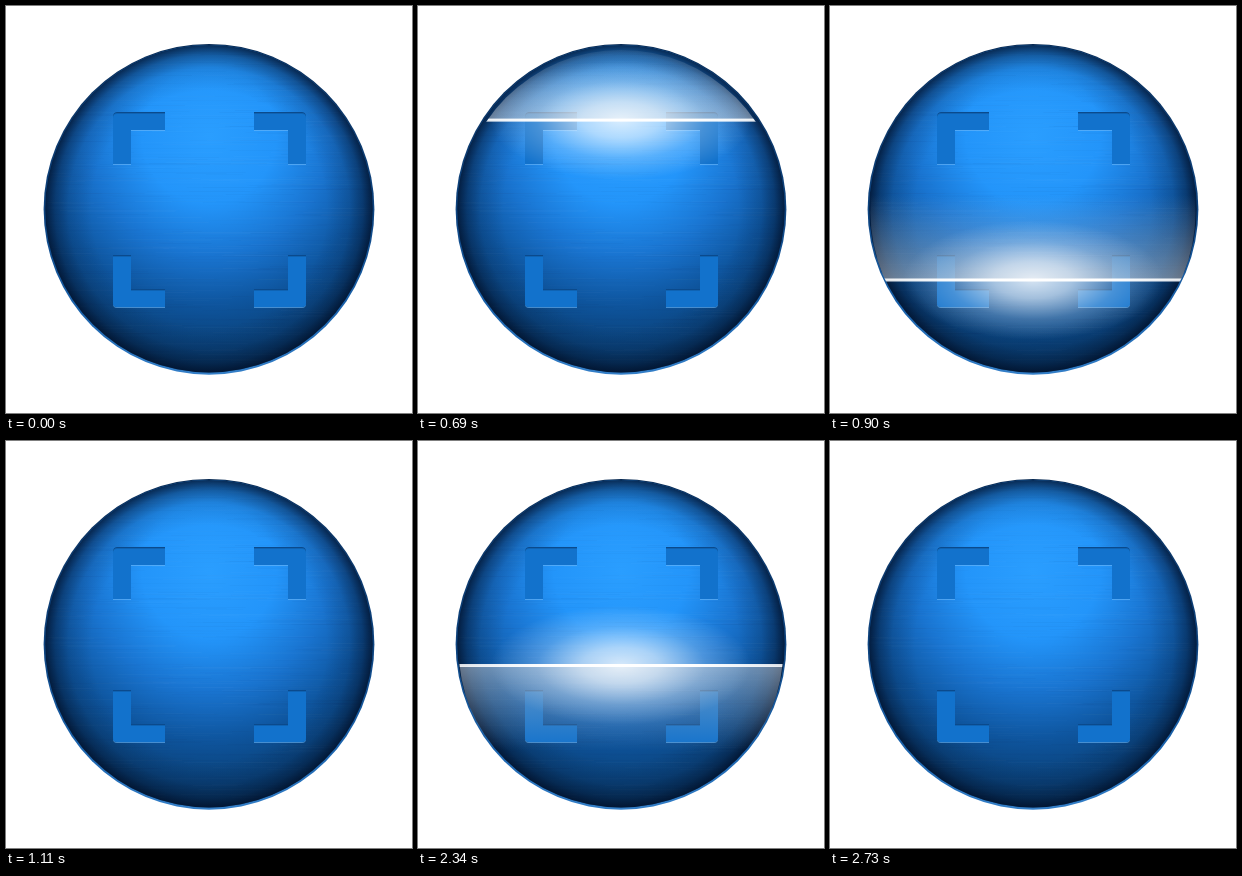
Animation, 406 px wide and 407 px high, one loop 3.6 s. Source, as an HTML page with a canvas:

```html
<!DOCTYPE html>
<html>
<head>
<meta charset="utf-8">
<title>Scanner button</title>
<style>
html, body { margin: 0; width: 100%; height: 100%; overflow: hidden; background: #fff; }
canvas { display: block; }
</style>
</head>
<body>
<canvas id="stage" width="406" height="407"></canvas>
<script>
const W = 406, H = 407, CX = 203, CY = 203.3, LOOP = 3600, STEP = 30, TRAIL = 85;
const ctx = document.getElementById('stage').getContext('2d');
const base = document.createElement('canvas');
base.width = W;
base.height = H;

function fillStops(g, stops) {
  stops.forEach(([at, color]) => g.addColorStop(at, color));
  return g;
}

function radial(c, x, y, r, stops) {
  return fillStops(c.createRadialGradient(x, y, 0, x, y, r), stops);
}

function disc(c, y, r, fill) {
  c.beginPath();
  c.arc(CX, y, r, 0, Math.PI * 2);
  c.fillStyle = fill;
  c.fill();
}

function streaks(c) {
  let seed = 7;
  const rnd = () => (seed = seed * 16807 % 2147483647) / 2147483647;
  c.save();
  c.beginPath();
  c.arc(CX, CY, 163, 0, Math.PI * 2);
  c.clip();
  for (let i = 0; i < 900; i++) {
    const a = rnd() * 0.016;
    c.fillStyle = rnd() < 0.5 ? `rgba(255,255,255,${a})` : `rgba(0,20,60,${a * 1.5})`;
    c.fillRect(rnd() * 400 - 20, 40 + Math.floor(rnd() * 328), 30 + rnd() * 90, 1);
  }
  c.restore();
}

function bracket(c, right, bottom) {
  const size = 52, thick = 18;
  const x = right ? 248 : 107, y = bottom ? 249 : 106;
  const post = right ? x + size - thick : x;
  const bar = bottom ? y + size - thick : y;
  const radii = [0, 0, 0, 0];
  radii[bottom ? (right ? 2 : 3) : (right ? 1 : 0)] = 4;
  const shape = new Path2D();
  shape.roundRect(x, bar, size, thick, radii);
  shape.roundRect(post, y, thick, size, radii);
  const fillAt = (dy, color) => {
    c.save();
    c.translate(0, dy);
    c.fillStyle = color;
    c.fill(shape);
    c.restore();
  };

  // Light below the edge, shade inside every upper edge.
  fillAt(1, 'rgba(110,185,250,.6)');
  c.save();
  c.clip(shape);
  fillAt(0, '#0b4a8c');
  fillAt(1, '#0f63b3');
  fillAt(2, '#1272cc');
  c.restore();
}

function drawBase(c) {
  disc(c, CY, 165.4, fillStops(c.createLinearGradient(0, 38, 0, 369), [
    [0, '#0a2c55'], [0.5, '#0e4480'], [0.8, '#1a62ab'], [1, '#347fc8']
  ]));
  disc(c, CY - 0.6, 163.8, radial(c, CX, 130, 240, [
    [0, '#2a9eff'], [0.28, '#2395fa'], [0.5, '#1974d0'], [0.7, '#0e559e'], [1, '#07335f']
  ]));
  streaks(c);
  disc(c, CY - 0.6, 163.8, radial(c, CX, CY - 0.6, 163.8, [
    [0.72, 'rgba(0,12,35,0)'], [0.86, 'rgba(0,12,35,.13)'],
    [0.94, 'rgba(0,12,35,.38)'], [1, 'rgba(0,12,35,.74)']
  ]));
  for (const right of [false, true]) {
    for (const bottom of [false, true]) bracket(c, right, bottom);
  }
}

function scanAt(t) {
  if (t >= 300 && t < 1110) {
    const y = t < 780 ? -10 + 188 * ((t - 300) / 480) ** 2 : 178 + (t - 780) * 0.8;
    return { y, dir: 1 };
  }
  if (t >= 2100 && t < 2730) return { y: 404.5 - (t - 2100) * 0.75, dir: -1 };
  return null;
}

function halo(y) {
  ctx.save();
  ctx.translate(CX, y);
  ctx.scale(1, 0.46);
  ctx.fillStyle = radial(ctx, 0, 0, 130, [
    [0, 'rgba(255,255,255,.82)'], [0.3, 'rgba(255,255,255,.62)'],
    [0.65, 'rgba(255,255,255,.22)'], [1, 'rgba(255,255,255,0)']
  ]);
  ctx.fillRect(-130, -130, 260, 260);
  ctx.restore();
}

function drawScan({ y, dir }) {
  ctx.save();
  ctx.beginPath();
  ctx.arc(CX, 206.5, 162.5, 0, Math.PI * 2);
  ctx.clip();

  const end = y - dir * TRAIL;
  ctx.fillStyle = fillStops(ctx.createLinearGradient(0, y, 0, end), [
    [0, 'rgba(190,195,202,.55)'], [0.45, 'rgba(180,188,198,.3)'], [1, 'rgba(170,180,195,0)']
  ]);
  ctx.fillRect(0, Math.min(y, end), W, TRAIL);
  halo(y);

  ctx.fillStyle = fillStops(ctx.createLinearGradient(42, 0, 364, 0), [
    [0, 'rgba(255,255,255,.85)'], [0.3, '#fff'], [0.7, '#fff'], [1, 'rgba(255,255,255,.85)']
  ]);
  ctx.fillRect(0, y - 1.5, W, 3);
  ctx.restore();
}

function frame() {
  const t = Math.floor(performance.now() % LOOP / STEP) * STEP;
  ctx.fillStyle = '#fff';
  ctx.fillRect(0, 0, W, H);
  ctx.drawImage(base, 0, 0);
  const scan = scanAt(t);
  if (scan) drawScan(scan);
  requestAnimationFrame(frame);
}

drawBase(base.getContext('2d'));
frame();
</script>
</body>
</html>
```
